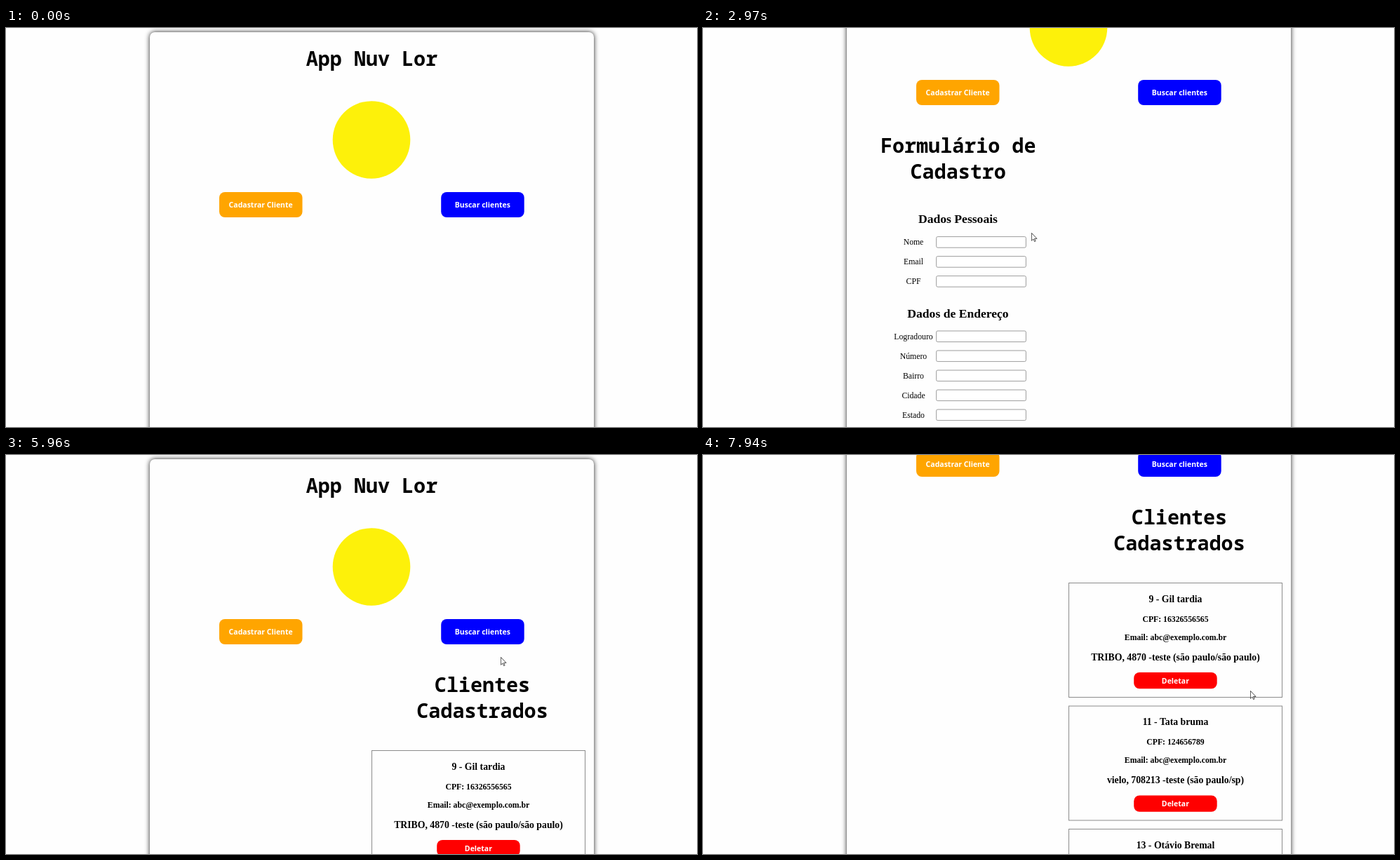
An HTML page that plays this animation: 985x569 px, repeating every 8 s.

```html
<!DOCTYPE html>
<html lang="pt-BR">
<head>
<meta charset="utf-8">
<title>App</title>
<style>
  html, body { margin: 0; width: 100%; height: 100%; overflow: hidden; background: #fefefe; }
  #stage { position: relative; width: 100%; height: 100%; overflow: hidden; contain: strict; }
  #page, #page svg { position: absolute; left: 0; top: 0; width: 985px; height: 900px; }
  #panel {
    position: absolute; left: 205px; top: 6px; width: 633px; height: 890px;
    border-radius: 7px; background: #fefefe; box-shadow: 0 0 7px #222;
  }
  #cursor { position: absolute; width: 9px; height: 14px; }
  text { text-anchor: middle; font: 11.73px "Liberation Serif", serif; }
  .title { font: bold 28.4px "Noto Sans Mono", monospace; }
  .section { font-weight: bold; font-size: 17.6px; }
  .big { font-weight: bold; font-size: 13.75px; }
  .small { font-weight: bold; }
  .label { font: bold 10.5px "Open Sans", sans-serif; fill: #fff; }
  .field { fill: #fff; stroke: #858585; stroke-width: .8; }
  .card { fill: none; stroke: #8c8c8c; }
</style>
</head>
<body>
<div id="stage">
  <div id="page">
    <div id="panel"></div>
    <svg>
      <g id="top"></g>
      <g id="form"></g>
      <g id="heading"></g>
      <g id="list"></g>
    </svg>
  </div>
  <svg id="cursor">
    <path d="M.4 .4V11.3L2.9 9 4.6 12.6 6.1 11.9 4.5 8.4H8Z" fill="#fff" stroke="#222" stroke-width=".8"/>
  </svg>
</div>
<script>
const $ = id => document.getElementById(id);

const text = (x, y, str, cls = "") => `<text x="${x}" y="${y}" class="${cls}">${str}</text>`;
const rect = (x, y, w, h, r, attrs) =>
  `<rect x="${x}" y="${y}" width="${w}" height="${h}" rx="${r}" ${attrs}/>`;
const button = (x, y, h, color, str) =>
  rect(x, y, 118.5, h, 8, `fill="${color}"`) + text(x + 59.2, y + h / 2 + 4, str, "label");
const field = (y, name) =>
  text(300, y + 4, name) + rect(332.6, y - 7.8, 127.8, 15.6, 2, 'class="field"');

function card(i, name, cpf, email, address) {
  const y = 421.5 + 175.5 * i;
  return rect(521.5, y, 304, 163, 0, 'class="card"') +
    text(673.5, y + 27, name, "big") +
    text(673.5, y + 55, "CPF: " + cpf, "small") +
    text(673.5, y + 81, "Email: " + email, "small") +
    text(673.5, y + 110, address, "big") +
    button(614.2, y + 127.5, 23.3, "#f00", "Deletar");
}

$("top").innerHTML =
  text(521.5, 53.5, "App Nuv Lor", "title") +
  '<circle cx="521" cy="159.5" r="55.3" fill="#fdf10a"/>' +
  button(304, 234, 36, "#ffa500", "Cadastrar Cliente") +
  button(620.2, 234, 36, "#00f", "Buscar clientes");

$("form").innerHTML =
  text(363.7, 338, "Formulário de", "title") +
  text(363.7, 374.5, "Cadastro", "title") +
  text(363.5, 438.3, "Dados Pessoais", "section") +
  ["Nome", "Email", "CPF"].map((s, i) => field(465.4 + 28 * i, s)).join("") +
  text(363.5, 572.5, "Dados de Endereço", "section") +
  ["Logradouro", "Número", "Bairro", "Cidade", "Estado"]
    .map((s, i) => field(599.8 + 28 * i, s)).join("");

$("heading").innerHTML =
  text(679, 338, "Clientes", "title") + text(679, 374.5, "Cadastrados", "title");

const email = "abc@exemplo.com.br";
$("list").innerHTML =
  card(0, "9 - Gil tardia", "16326556565", email, "TRIBO, 4870 -teste (são paulo/são paulo)") +
  card(1, "11 - Tata bruma", "124656789", email, "vielo, 708213 -teste (são paulo/sp)") +
  card(2, "13 - Otávio Bremal", "124656789", email, "vielo, 708213 -teste (são paulo/sp)");

// start time, cursor position (null: hidden), scroll offset, visible groups
const steps = [
  [0, null, 0, ""],
  [650, [584, 364], 0, ""],
  [980, [406, 308], 0, ""],
  [1310, [377, 269], 0, ""],
  [1640, [366, 258], 0, ""],
  [1970, [390, 274], 0, "form"],
  [2300, [421, 286], 48, "form"],
  [2640, [421, 286], 160, "form"],
  [2970, [468, 292], 160, "form"],
  [3300, [508, 291], 8, "form"],
  [3640, [508, 291], 0, "form"],
  [3970, [386, 270], 0, "form"],
  [4300, [390, 264], 0, ""],
  [4640, [527, 256], 0, ""],
  [4970, [663, 264], 0, ""],
  [5300, [663, 264], 0, "heading"],
  [5630, [674, 258], 0, "heading"],
  [5960, [705, 288], 0, "heading list"],
  [6290, [705, 288], 150, "heading list"],
  [6620, [705, 288], 239, "heading list"],
  [6950, [913, 506], 239, "heading list"],
  [7280, null, 239, "heading list"],
  [7610, [817, 448], 239, "heading list"],
  [7940, [780, 336], 239, "heading list"]
];

const start = performance.now();
function draw(now) {
  const t = Math.max(0, now - start) % 8000;
  const [, pos, scroll, shown] = steps.findLast(s => s[0] <= t);
  $("page").style.top = -scroll + "px";
  for (const id of ["form", "heading", "list"])
    $(id).style.display = shown.includes(id) ? "" : "none";
  const cursor = $("cursor").style;
  cursor.display = pos ? "" : "none";
  if (pos) [cursor.left, cursor.top] = pos.map(v => v + "px");
  requestAnimationFrame(draw);
}
draw(start);
</script>
</body>
</html>
```
